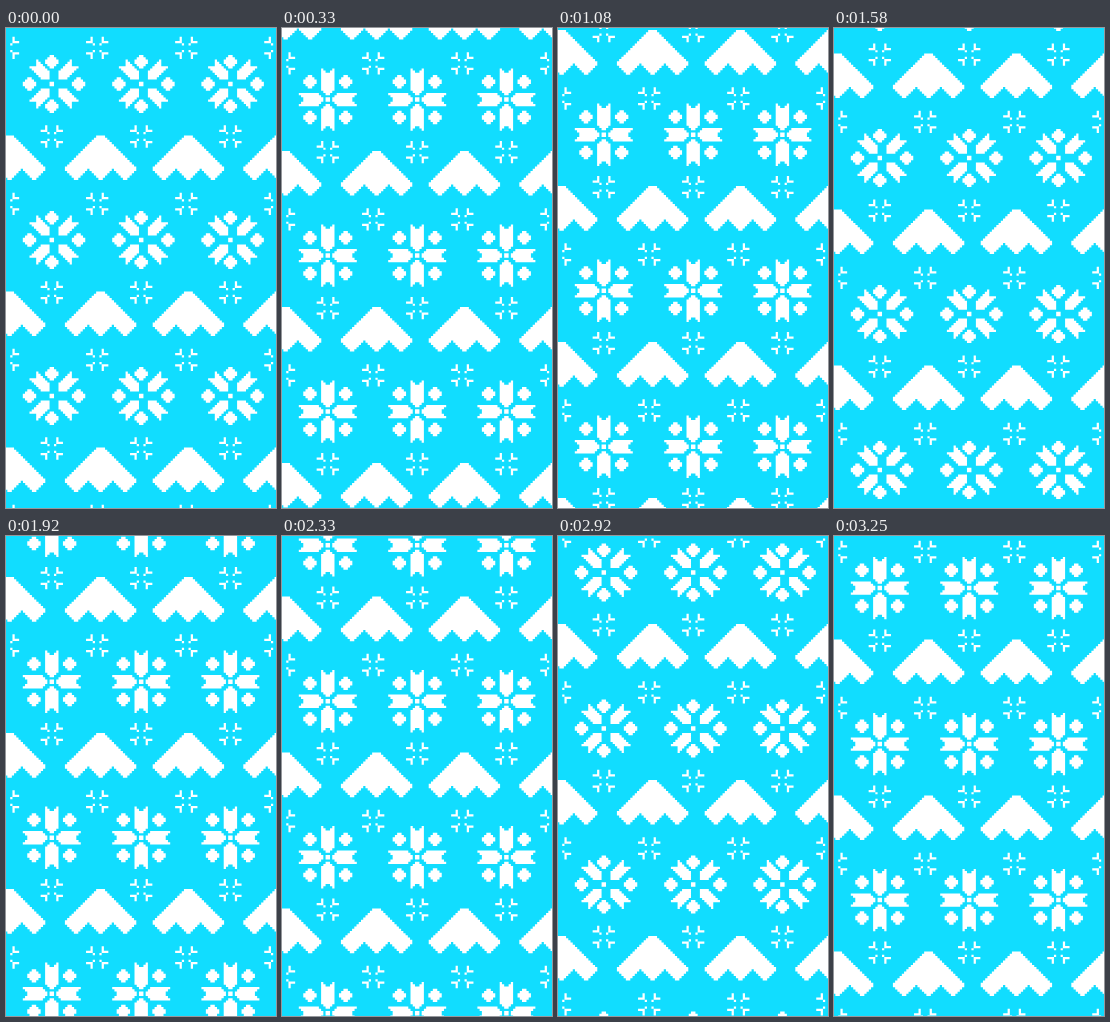
These frames come from a looping animation (270x480 px, 3330 ms). An HTML page with a canvas:

```html
<!DOCTYPE html>
<html lang="en">
<head>
<meta charset="utf-8">
<title>Winter knit pattern</title>
<style>
  html, body { margin: 0; width: 100%; height: 100%; overflow: hidden; background: #11ddff; }
  canvas { display: block; width: 270px; height: 480px; }
</style>
</head>
<body>
<canvas id="stage" width="270" height="480"></canvas>
<script>
const ctx = document.getElementById('stage').getContext('2d');
const CELL = 2.23;     // one stitch
const ROW = 156;       // vertical repeat
const LOOP = 3330;
const STEPS = 40;
const { abs, min, max, floor } = Math;

// Adds every stitch for which inside(x, y) holds, merged into horizontal runs.
function stitch(path, cx, cy, inside) {
  for (let y = -22.5; y < 23; y++) {
    let start = null;
    for (let x = -18.5; x < 19; x++) {
      const on = inside(x, y);
      if (on && start === null) start = x;
      if (!on && start !== null) {
        path.rect(cx + (start - 0.5) * CELL, cy + (y - 0.5) * CELL, (x - start) * CELL, CELL);
        start = null;
      }
    }
  }
}

const dot = (a, b) => max(a, b) < 3 && a + b <= 3;

// The petals and side dots sit one stitch right of the middle.
function diagonalStar(x, y) {
  const a = abs(x - 1), b = abs(y), lo = min(a, b);
  if (max(abs(x), b) < 1) return true;
  if (lo >= 2.5 && lo <= 7.5 && abs(a - b) <= 3) return true;
  return dot(abs(x), abs(b - 10)) || dot(abs(a - 11), b);
}

function uprightStar(x, y) {
  const a = abs(x), b = abs(y), w = min(a, b), t = max(a, b);
  if (t < 1) return true;
  const reach = a > b ? 10 : 11;
  if (w <= 2.5 && w <= t - 1.5 && t <= reach + w) return true;
  return dot(abs(a - 8), abs(b - 8));
}

// Four short arms, each ending in an open fork.
function crystal(x, y) {
  const a = abs(x), b = abs(y), lo = min(a, b);
  return (a === b && lo === 1.5) || (lo === 2.5 && max(a, b) < 5);
}

function mountain(x, y) {
  const a = abs(x), row = y - 0.5;
  return row >= 0 && a <= 2 + row && a < 16 && row <= 19.5 - min(a, abs(a - 11));
}

function band(star) {
  const path = new Path2D();
  for (const x of [2, 91.2, 180.3, 269.4]) stitch(path, x, 19.8, crystal);
  for (const x of [45.8, 135.2, 224.4]) {
    stitch(path, x, 56, star);
    stitch(path, x, 108.5, crystal);
  }
  for (const x of [3.6, 94.6, 182.4, 273]) stitch(path, x, 107.4, mountain);
  return path;
}

const bands = [band(diagonalStar), band(uprightStar)];

function draw(now) {
  const time = now % LOOP;
  const step = floor((floor(time / 10) + 0.5) * 0.12);
  const shift = ROW * step / STEPS;
  const path = bands[floor(step / 4) % 2];

  ctx.setTransform(1, 0, 0, 1, 0, 0);
  ctx.fillStyle = '#11ddff';
  ctx.fillRect(0, 0, 270, 480);
  ctx.fillStyle = '#fff';
  for (let i = -2; i < 4; i++) {
    ctx.setTransform(1, 0, 0, 1, 0, shift + i * ROW);
    ctx.fill(path);
  }
}

const origin = performance.now();
function tick() {
  draw(performance.now() - origin);
  requestAnimationFrame(tick);
}
tick();
</script>
</body>
</html>
```
